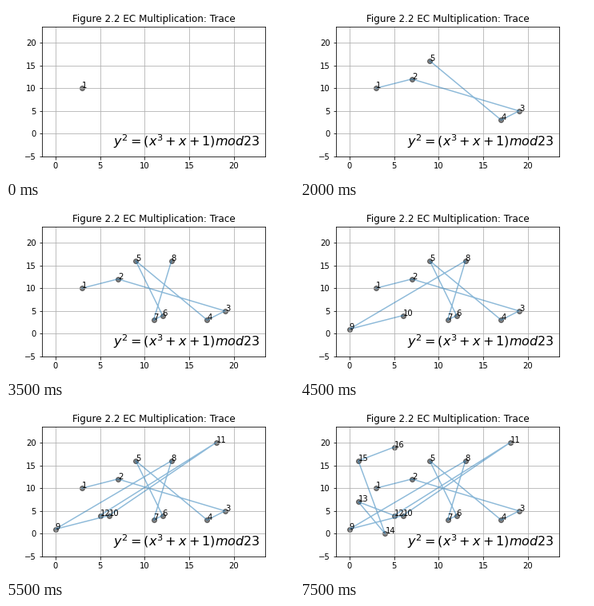
A matplotlib script that plays this animation: 360 px wide and 216 px high, repeating every 8 s.

```python
import matplotlib.pyplot as plt
from matplotlib.animation import FuncAnimation

P = 23          # field prime
A = 1           # curve: y^2 = x^3 + A x + 1
BASE = (3, 10)
STEPS = 16


def add(p, q):
    """Add two finite curve points over GF(P)."""
    (x1, y1), (x2, y2) = p, q
    if p == q:
        slope = (3 * x1 * x1 + A) * pow(2 * y1, -1, P)
    else:
        slope = (y2 - y1) * pow(x2 - x1, -1, P)
    x = (slope * slope - x1 - x2) % P
    return x, (slope * (x1 - x) - y1) % P


points = [BASE]
while len(points) < STEPS:
    points.append(add(points[-1], BASE))

fig, ax = plt.subplots(figsize=(5, 3), dpi=72)
fig.subplots_adjust(left=0.125, right=0.9, bottom=0.125, top=0.88)
ax.set_xlim(-1.5, 23.5)
ax.set_ylim(-5, 23.5)
ax.set_xticks(range(0, 21, 5))
ax.set_yticks(range(-5, 21, 5))
ax.grid(True)
ax.set_title("Figure 2.2 EC Multiplication: Trace", fontsize=12)
ax.text(0.975, 0.05, "$y^2 = (x^3 + x + 1) mod 23$", fontsize=16,
        ha="right", va="bottom", transform=ax.transAxes)

trace, = ax.plot([], [], color="C0", alpha=0.5)
dots = ax.scatter([], [], color="black", alpha=0.5, linewidth=1)
labels = [ax.text(x, y, str(n), fontsize=10)
          for n, (x, y) in enumerate(points, 1)]


def draw(step):
    shown = points[:step + 1]
    trace.set_data(*zip(*shown))
    dots.set_offsets(shown)
    for n, label in enumerate(labels):
        label.set_visible(n <= step)
    return [trace, dots, *labels]


anim = FuncAnimation(fig, draw, frames=STEPS, interval=500,
                     repeat=True, repeat_delay=0, blit=False)
plt.show()
```
